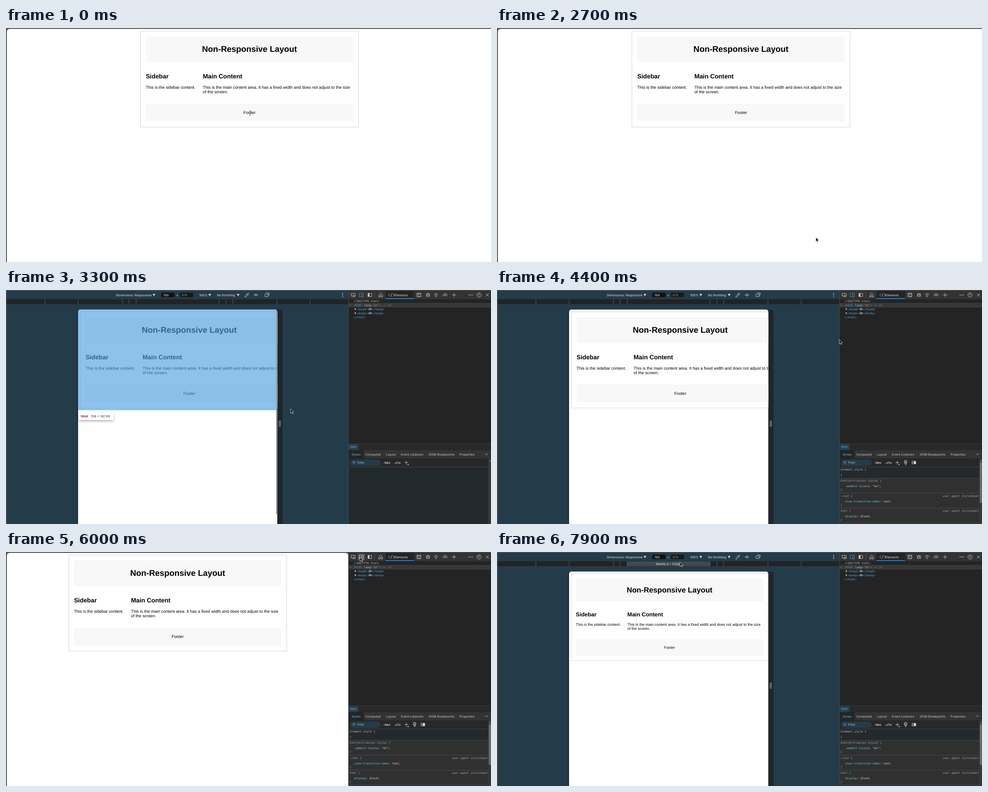
An HTML page that plays this animation: 1077x520 px, repeating every 8 s.

```html
<!DOCTYPE html>
<html lang="en">
<head>
<meta charset="utf-8">
<title>Responsive check</title>
<style>
html, body { margin: 0; height: 100%; overflow: hidden; background: #55555a; }
svg { display: block; width: 100vw; height: 100vh; }
text { white-space: pre; text-rendering: geometricPrecision; font: 6.9px Inter, sans-serif; fill: #e4e4e4; }
.menu text { font-size: 7.48px; }
.page text { font: 16px "Liberation Sans", Arial, sans-serif; fill: #000; }
.page .h1 { font-size: 32px; font-weight: bold; }
.page .h2 { font-size: 24px; font-weight: bold; }
.mono text { font: 6.33px "DejaVu Sans Mono", monospace; fill: #bdbdbd; }
.mono .b { font-weight: bold; fill: #eee; }
.mono .i { font-style: italic; fill: #a5a5a5; }
.tag { fill: #58a6dc; } .attr { fill: #a9cdea; } .val { fill: #f29766; } .dim { fill: #707070; font-style: italic; }
.prop { fill: #5fd3f0; } .lit { fill: #e2e2e2; }
.mid { text-anchor: middle; } .end { text-anchor: end; }
.icon { fill: none; stroke: #e0e0e0; stroke-width: .8; stroke-linecap: round; stroke-linejoin: round; }
</style>
</head>
<body>
<svg id="stage" viewBox="0 0 1077 520" preserveAspectRatio="none"></svg>
<script>
const ZOOM = 0.5757, LOOP = 8000;
const $ = id => document.getElementById(id);
const rect = (x, y, w, h, fill, more = '') =>
  `<rect x="${x}" y="${y}" width="${w}" height="${h}" fill="${fill}" ${more}/>`;
const text = (x, y, s, cls = '', more = '') => `<text x="${x}" y="${y}" class="${cls}" ${more}>${s}</text>`;
const icon = (x, y, d, more = '') => `<path class="icon" transform="translate(${x} ${y})" d="${d}" ${more}/>`;
const group = (id, body, more = '') => `<g id="${id}" ${more}>${body}</g>`;
const span = (cls, s) => `<tspan class="${cls}">${s}</tspan>`;
const caret = (x, y) => `<path d="M${x - 3} ${y - 2.5}h6l-3 5z" fill="#ddd"/>`;

// Demo page, in CSS pixels from the container's corner
const page = group('page',
  rect(.5, .5, 841, 370.7, '#fff', 'stroke="#c4c4c4" stroke-width="1.3"') +
  rect(21, 21, 800, 99.9, '#f8f8f8') + rect(21, 280.4, 800, 70.3, '#f8f8f8') +
  text(421, 81.4, 'Non-Responsive Layout', 'h1 mid') +
  text(21, 182.6, 'Sidebar', 'h2') + text(241, 182.6, 'Main Content', 'h2') +
  text(21, 222.6, 'This is the sidebar content.') +
  text(241, 222.6, 'This is the main content area. It has a fixed width and does not adjust to the size') +
  text(241, 240.8, 'of the screen.') + text(421, 321, 'Footer', 'mid'), 'class="page"');

// Context menu
const items = [
  [273.5, 'M4 0H-4M-1-3.5L-4.5 0-1 3.5', 'Back', 'Alt+Left arrow'],
  [293, 'M3.5-2A4 4 0 1 0 4 .5M3.8-4.5V-2H1.3', 'Refresh', 'Ctrl+R'],
  [317, 'M0 4H-4V-4H2L4-2V-1M-2-4V-1.5H1.5V-4M-2 4V1H0M1 4L4 .5', 'Save as', 'Ctrl+S'],
  [336, 'M-2.5 2H-4V-1.5H4V2H2.5M-2.5-1.5V-4H2.5V-1.5M-2.5 .5H2.5V4H-2.5Z', 'Print', 'Ctrl+P'],
  [355, 'M-4-1Q-1-3-1 0V2.5M-1 0Q-5 0-4 2T-1 1M1-4V2.5M1 0Q4-2 4 1T1 2M3-4h2', 'Translate to English', ''],
  [379, 'M-2-2H4.5V4.5H-2ZM-2 2H-4L-4.5-3 2-4.5 2.4-2M1.2-.4V3M-.5 1.3H3', 'Add page to Collections', ''],
  [403.5, 'M-1-3.5H-4V4H3.5V2M1-4L4.5-1 1 2V0Q-2 0-2.5 2-2-2 1-2Z', 'Share', ''],
  [427.5, 'M-4.5-1V-4H-2M0-4H1M3-4H4.5V-1M-4.5 1V3H-3M4.5 1V3M-1-1L3 4M2-1L-2 4', 'Screenshot', 'Ctrl+Shift+S'],
  [452, '', 'View page source', 'Ctrl+U'],
  [471, 'M-1 2.5H-4.5V-3.5H4.5V2H3M0 0V5L1.5 3.5H4Z', 'Inspect', '']
];
const menu = group('menu',
  rect(656, 262, 193, 221, '#4a4a4a', 'rx="4" filter="url(#shade)"') +
  rect(656, 0, 193, 19, '#636363', 'id="hover"') +
  [304.5, 367, 391, 415, 439].map(y => rect(656, y - .3, 193, .7, '#6b6b6b')).join('') +
  items.map(([y, d, label, keys], i) => `<g opacity="${i ? 1 : .42}">` +
    icon(669, y, d) + text(680, y + 2.7, label) +
    text(828, y + 2.7, keys, 'end', 'style="fill:#b8b8b8"') + '</g>').join('') +
  '<path d="M838 376.8l2.8 2.3-2.8 2.3z" fill="#ccc"/>', 'class="menu"');

// Device emulation chrome
const ticks = [320, 375, 425, 768, 1024].flatMap(w => [381 - w * .2875, 381 + w * .2875]);
const device = group('device',
  rect(1.5, 1.5, 758.5, 519, '#243b49') + rect(1.5, 20.5, 758.5, 11, '#212325') +
  rect(289, 21, 184, 10.5, '#45494c', 'id="bar"') +
  ticks.map(x => rect(x - .4, 20.5, .8, 11, '#657178')).join('') +
  text(381, 29, 'Mobile S – 320px', 'mid', 'id="barText"') +
  rect(157, 44, 3, 476, '#1d2f3a') + rect(602, 44, 12, 476, '#1e262b') +
  icon(608, 297, 'M-1.3-6.5V6.5M1.3-6.5V6.5') +
  text(244, 13.6, 'Dimensions: Responsive') + caret(328.5, 11.3) +
  rect(345, 6, 29, 10, '#111', 'rx="1.5"') + text(349, 13.6, '768') +
  text(377.7, 13.6, '×') +
  rect(386.5, 6, 29, 10, '#171a1b', 'rx="1.5"') + text(390, 13.6, '879', '', 'style="fill:#95918a"') +
  text(429, 13.6, '100%') + caret(452.5, 11.3) +
  text(468.5, 13.6, 'No throttling') + caret(515.5, 11.3) +
  icon(535, 11, 'M-4.5 4.5L-4 2 0-2 2 0-2 4ZM-1-3L3 1M1-2L3-4.5 4.5-3 2-1') +
  icon(555, 11, 'M-4.5 1Q0-6 4.5 1M-1.7 1a1.7 1.7 0 1 0 3.4 0a1.7 1.7 0 1 0-3.4 0') +
  icon(580, 11, 'M-4.5-2H2V3.5H-4.5ZM-2-4.5H4V-2M4-1L5-3M2 1H4.5') +
  [7.5, 11, 14.5].map(y => `<circle cx="747.5" cy="${y}" r=".9" fill="#ddd"/>`).join(''));

// Developer tools panel
const DEVICE_ICON = 'M-4.5 3.5V-4H4.5V-2.5M-4.5 3.5H-.5M1-1H4.5V4.5H1Z';
const tools = [
  [771, 'M-1 2.5H-4.5V-3.5H4.5V2H3M0 0V5L1.5 3.5H4Z'],
  [808, 'M-4-3.5H4V3.5H-4ZM-1.5-3.5V3.5M-3-3V3'],
  [832, 'M-4 0L0-4.5 4 0V4.5H1.3V1H-1.3V4.5H-4Z'],
  [917, 'M-4-4H4V4H-4ZM-4-2H4M-2 0L0 1.5-2 3M1 3H3'],
  [937, 'M-2-2H2V2Q0 6-2 2ZM-2-2Q0-6 2-2M-4.5-3L-2-1M4.5-3L2-1M-4.5 1H-2M4.5 1H2M-4 4L-2 2M4 4L2 2'],
  [955, 'M-4.5-1Q0-6 4.5-1M-2.8 1Q0-2.2 2.8 1M-1 2.8Q0 1.6 1 2.8L0 4Z'],
  [975, 'M-4.5 2Q-4.5-4 1-3.5M3-2Q5 0 4.5 2M0 2L3-2.5M-2 1Q-1-1 0-1M-1 2h2'],
  [995, 'M-4 0H4M0-4V4'],
  [1050.5, 'M-4.7 0a4.7 4.7 0 1 0 9.4 0a4.7 4.7 0 1 0-9.4 0M-1.4-1Q-1-3 .4-2.5T0 .8M0 2.5V2.6'],
  [1069, 'M-3-3L3 3M3-3L-3 3']
];
const node = (y, name) => `<path d="M774.5 ${y - 2.5}l3.6 2.5-3.6 2.5z" fill="#bbb"/>` +
  rect(804.5, y - 2.3, 8, 4.8, '#62717a', 'rx="2.2"') +
  icon(808.5, y, 'M-2 0h0M0 0h0M2 0h0') +
  text(780, y + 2.2, `&lt;${name}&gt;`, 'tag', 'style="fill:#58a6dc"') +
  text(813, y + 2.2, `&lt;/${name}&gt;`, 'tag', 'style="fill:#58a6dc"');
const rule = (y, head, prop, value, agent) =>
  rect(761, y - 6, 310, .7, '#4f5457') + text(763, y + 2.2, head, 'i') +
  text(773, y + 14.2, span('prop', prop) + span('lit', `: ${value};`), 'i') +
  text(763, y + 22.4, '}', 'i') + (agent ? text(1070, y + 2.2, 'user agent stylesheet', 'i end') : '');
const tabs = [[798, 'Computed'], [844, 'Layout'], [877, 'Event Listeners'], [939, 'DOM Breakpoints'], [1007, 'Properties']];

const styles = group('styles',
  rect(761, 418, 310, 102, '#303030') + rect(761, 394, 310, 24, '#23292c') +
  text(763, 401.3, 'element.style {') + text(763, 413.3, '}') +
  rule(424, 'html[Attributes Style] {', '-webkit-locale', '"en"') +
  rule(457.3, ':root {', 'view-transition-name', 'root', true) +
  rule(490.6, 'html {', 'display', 'block', true) + rect(761, 517.5, 310, .7, '#4f5457') +
  icon(907.5, 383.5, 'M-2.5-4.5H2.5V1H-2.5ZM-2.5-1H2.5M-1 1V4.5H1V1M0-4.5V-3') +
  icon(926, 383.5, 'M-4-3H4V3H-4ZM1-3V3M-3 0H0M-1.5-1.5L0 0-1.5 1.5') +
  rect(926.5, 381, 3.2, 5, '#eee') + rect(1072, 383, 5, 90, '#6a6a6a'));

const panel = group('panel',
  rect(760, 1.5, 317, 519, '#242424') + rect(760, 1.5, 317, 19, '#333') +
  rect(843, 2.5, 63, 17.5, '#242424', 'rx="2"') + rect(843, 18, 63, 2, '#1480e0') +
  rect(818, 5, .7, 12, '#606060') +
  rect(0, 3.5, 16, 15, '#505050', 'id="button" rx="2"') +
  tools.map(([x, d]) => icon(x, 11, d)).join('') +
  rect(804.5, 7.8, 2.2, 6.5, '#ddd') + icon(789, 11, DEVICE_ICON, 'id="toggle"') +
  icon(856, 11, 'M-3.5-3L-6.5 0-3.5 3M3.5-3L6.5 0 3.5 3M1.2-3.5L-1.2 3.5') + text(862.5, 13.5, 'Elements') +
  [1028.5, 1032, 1035.5].map(x => `<circle cx="${x}" cy="11" r=".9" fill="#ddd"/>`).join('') +
  rect(761, 29.3, 316, 9, '#353738') + rect(761, 29.3, 316, .6, '#4c4c4c') + rect(761, 37.7, 316, .6, '#4c4c4c') +
  rect(760, 342, 317, 14, '#292929') + rect(760, 341.5, 317, .7, '#464646') +
  rect(761, 342.5, 22, 13, '#254152') + text(764.3, 351.3, 'html', '', 'style="fill:#5fb2e2"') +
  rect(760, 356, 317, 18.5, '#333') + rect(761, 356, 33, 18.5, '#242424') +
  text(767.5, 367.6, 'Styles', '', 'style="fill:#5cc1ee"') +
  tabs.map(([x, s]) => text(x, 367.6, s, '', 'style="fill:#c8c8c8"')).join('') +
  icon(1067, 365, 'M-2.7-1.3L0 1.3 2.7-1.3') +
  rect(760, 374.5, 317, 19, '#282828') + rect(760, 393, 317, 127, '#22292c') +
  rect(760, 393, 317, .7, '#4b4f52') + rect(1071, 374.5, 6, 146, '#383838') +
  rect(764, 377, 68, 13.8, '#243c4a', 'rx="6.9"') +
  icon(772.5, 383.8, 'M-3-2.2H3M-2 0H2M-1 2.2H1', 'style="stroke:#62bce8"') +
  text(779.5, 386.4, 'Filter', '', 'style="fill:#a9b4ba"') +
  icon(889, 383.5, 'M-3.7 0H3.7M0-3.7V3.7') + '<path d="M894 386v3h-3z" fill="#ddd"/>' +
  '<path d="M1073 380.5l1.8-2.5 1.8 2.5z" fill="#999"/>' +
  group('dom',
    text(838, 386, ':hov', 'b') + text(861, 386, '.cls', 'b') +
    text(772, 27.3, '&lt;!DOCTYPE html&gt;') +
    icon(764.5, 33.8, 'M-2 0h0M0 0h0M2 0h0', 'stroke-width="1"') +
    text(772, 36, span('tag', '&lt;html ') + span('attr', 'lang') + span('tag', '="') +
      span('val', 'en') + span('tag', '"&gt;') + span('dim', ' == $0')) +
    node(42.6, 'head') + node(51.6, 'body') + text(772, 62.8, '&lt;/html&gt;', '', 'style="fill:#58a6dc"') +
    styles, 'class="mono"') +
  rect(760, 1.5, .9, 519, '#4a4d50'));

const tip = group('tip',
  '<path d="M166 272.5l6-5 6 5z" fill="#fff"/>' +
  rect(161, 272, 78, 17, '#fff', 'rx="2.5" filter="url(#shade)"') +
  text(166.3, 283.2, 'html', '', 'style="fill:#881280;font-weight:bold;font-size:7.3px"') +
  text(188.3, 283.2, '768 × 387.69', '', 'style="fill:#333"'));

$('stage').innerHTML =
  `<defs><filter id="shade" x="-20%" y="-30%" width="140%" height="170%">
    <feDropShadow dx="0" dy="2.5" stdDeviation="2.5" flood-opacity=".3"/></filter>
  <clipPath id="screen">${rect(160, 43.5, 442.4, 490, '#fff', 'rx="5"')}</clipPath></defs>` +
  rect(0, 0, 1077, 520, '#55555a') + device +
  group('view', rect(2, 2, 1100, 540, '#fff', 'id="paper" rx="6"') + page +
    rect(160, 43.5, 442.4, 223.6, 'rgb(75,160,225)', 'id="glow" opacity=".64"') +
    rect(600, 47, 2, 451, '#8f8f8f', 'id="scroll"')) +
  tip + panel + menu +
  '<path id="beam" class="icon" style="stroke:#555" transform="translate(542 189)" d="M-1.8-5H1.8M0-5V5M-1.8 5H1.8"/>' +
  '<path id="arrow" d="M0 0V9.8L2.3 7.8 4 11.2 5.6 10.5 4 7.2H7Z" fill="#111" stroke="#fff" stroke-width=".7"/>';

// Pointer path: time, x, y
const path = [[0, 542, 189], [400, 655, 263], [1200, 655, 263], [1300, 668, 295], [1500, 705, 403],
  [2100, 708, 465], [2800, 708, 465], [3200, 632, 264], [3900, 632, 264], [4300, 740, 150],
  [4600, 800, 30], [4800, 808, 11], [5200, 798, 9], [5300, 798, 9], [5500, 786, 11], [6100, 786, 11],
  [6300, 768, 11], [6500, 768, 11], [6800, 786, 11], [7300, 786, 11], [7900, 406, 22]];

function pointer(t) {
  const i = Math.max(1, path.findIndex(p => p[0] >= t));
  const [a, b] = [path[i - 1], path[i]], k = (t - a[0]) / (b[0] - a[0]);
  return [a[1] + (b[1] - a[1]) * k, a[2] + (b[2] - a[2]) * k];
}
const show = (id, on) => { $(id).style.display = on ? '' : 'none'; };
const set = (id, attrs) => Object.entries(attrs).forEach(([k, v]) => $(id).setAttribute(k, v));
const within = (t, from, to) => t >= from && t < to;

function render(t) {
  const [x, y] = pointer(t);
  const docked = t >= 2900, emulated = within(t, 2900, 5900) || t >= 7200;
  const scale = t >= 7200 ? ZOOM * 768 / 850 : ZOOM;
  const left = emulated ? 160 + 8 * scale : docked ? 138.8 : t >= 2700 ? 299.4 : 298.3;
  const top = emulated ? 43.8 + 8 * scale : 6.5;

  set('page', { transform: `translate(${left} ${top}) scale(${scale})` });
  set('paper', { width: docked && !emulated ? 758 : 1100 });
  set('view', { 'clip-path': emulated ? 'url(#screen)' : 'none' });
  show('device', emulated);
  show('panel', docked);
  show('styles', t >= 3500);
  show('glow', within(t, 3100, 4400));
  show('tip', within(t, 3100, 4400));
  show('scroll', within(t, 3000, 3700));
  set('scroll', { opacity: t >= 3600 ? .5 : 1 });
  $('toggle').style.stroke = emulated ? '#3fa9f0' : '#e0e0e0';

  const button = [771, 789, 808].find(c => Math.abs(c - x) < 9);
  show('button', button && y < 20);
  if (button) set('button', { x: button - 8 });

  show('menu', within(t, 800, 2400));
  set('menu', { opacity: t < 900 ? .5 : 1 });
  const item = t >= 1300 && items.find(m => Math.abs(m[0] - y) < 9.6);
  show('hover', item);
  if (item) set('hover', { y: item[0] - 9.5 });

  const onRuler = t > 7300 && y > 20.5;
  show('bar', onRuler);
  show('barText', onRuler);

  show('beam', t < 100);
  show('arrow', t >= 100);
  set('arrow', { transform: `translate(${x} ${y})` });
}

const start = performance.now();
function tick() {
  const t = (performance.now() - start) % LOOP;
  render(Math.floor(t / 100) * 100); // the screen refreshes ten times a second
  requestAnimationFrame(tick);
}
tick();
</script>
</body>
</html>
```
